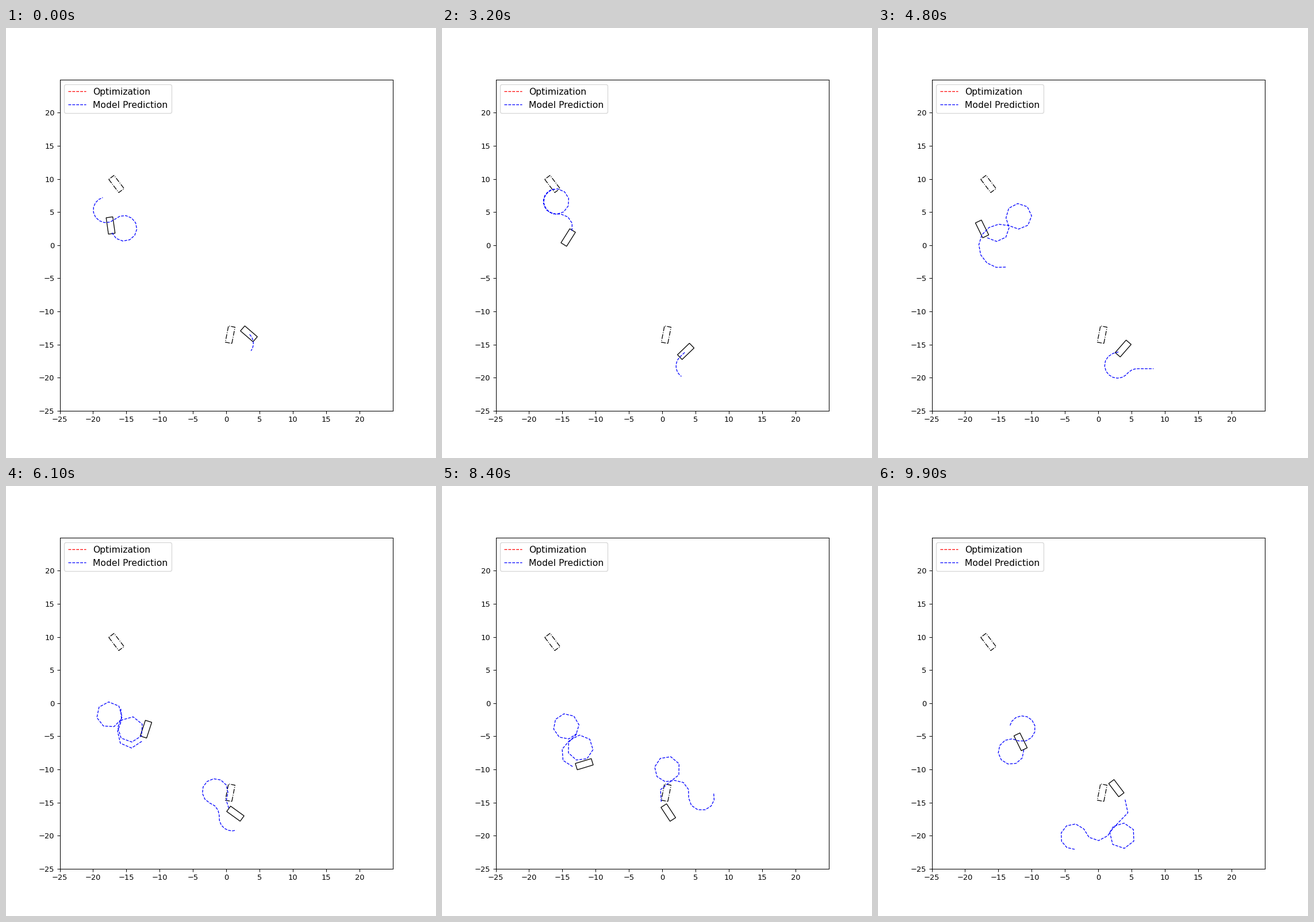
Animation of 748x748 px, one loop 10000 ms. Source, as a matplotlib script:

```python
import numpy as np
import matplotlib.pyplot as plt
from matplotlib.animation import FuncAnimation
from matplotlib.patches import Rectangle

SIZE, DPI, FRAMES = 748, 93.5, 100
LENGTH, WIDTH = 2.5, 1.0
HORIZON = 20
RADIUS = 1.93
CURVES = {"L": 1 / RADIUS, "R": -1 / RADIUS, "W": 1 / 3.3, "S": 0}
PLAN_AT = (0, 16, 32, 48, 61, 84, 99)


def drive(keys):
    """Poses per frame: circles between (frame, x, y, heading) keys, drifting to meet them."""
    pos, head = np.zeros(FRAMES, complex), np.zeros(FRAMES)
    for (f0, x0, y0, h0), (f1, x1, y1, h1) in zip(keys, keys[1:]):
        n = f1 - f0
        h = np.radians(np.linspace(h0, h1, n + 1))
        step = RADIUS * np.abs(np.diff(h)) * np.exp(0.5j * (h[1:] + h[:-1]))
        p = x0 + 1j * y0 + np.r_[0, np.cumsum(step)]
        p += (x1 + 1j * y1 - p[-1]) * np.linspace(0, 1, n + 1)
        pos[f0:f1 + 1], head[f0:f1 + 1] = p, h
    return pos, head


def plan(route, slowing):
    """Step lengths and turns of a route: L/R/W turn by degrees, S goes straight."""
    dist, head = [0], [0]
    for word in route.split():
        curve, amount = CURVES[word[0]], float(word[1:])
        turn = np.sign(curve) * np.radians(amount)
        dist.append(dist[-1] + (turn / curve if curve else amount))
        head.append(head[-1] + turn)
    s = np.linspace(0, dist[-1], 2001)
    h = np.interp((s[1:] + s[:-1]) / 2, dist, head)
    path = np.r_[0, np.cumsum(s[1] * np.exp(1j * h))]
    t = np.linspace(0, 1, HORIZON + 1)
    steps = np.diff(np.interp((t + slowing * t * (1 - t)) * s[-1], s, path))
    return np.abs(steps), np.angle(steps / np.r_[1, steps[:-1]])


class Car:
    def __init__(self, keys, routes):
        self.pos, self.head = drive(keys)
        self.plans = [plan(*r) for r in routes]

    def predict(self, i):
        """New turns enter the plan from the far end of the horizon."""
        k = min(np.searchsorted(PLAN_AT, i, side="right") - 1, len(PLAN_AT) - 2)
        u = (i - PLAN_AT[k]) / (PLAN_AT[k + 1] - PLAN_AT[k])
        (len0, turn0), (len1, turn1) = self.plans[k], self.plans[k + 1]
        turn = np.where(np.arange(HORIZON) < round(HORIZON * (1 - u)), turn0, turn1)
        step = (len0 + (len1 - len0) * u) * np.exp(1j * (self.head[i] + np.cumsum(turn)))
        return self.pos[i] + np.cumsum(step)


cars = (
    Car([(0, -17.37, 2.97, -82), (16, -15.04, 0.72, 381), (32, -14.13, 1.15, 778),
         (48, -17.45, 2.45, 1376), (56, -16.33, 1.19, 1776), (58, -13.23, -0.46, 1770),
         (61, -12.06, -3.93, 1692), (84, -11.72, -9.22, 557), (99, -11.67, -5.84, -64)],
        [("S0.7 L306 R209", 0.25),
         ("S0.4 L84 R321", 0),
         ("S0.7 L130 R539", 0),
         ("S0.9 L183 R330 W226", 0),
         ("S1.6 R162 S0.9 R395 L422", 0.1),
         ("S1 R152 S1.3 R372 L383", 0.1),
         ("S0.7 R322 L285", 0.25)]),
    Car([(0, 3.38, -13.39, -41), (16, 2.13, -12.70, -6), (32, 3.51, -16.04, -136),
         (48, 3.72, -15.61, -491), (61, 1.35, -16.69, -936),
         (84, 0.89, -16.52, -2037), (99, 2.70, -12.84, -2933)],
        [("R84", 0),
         ("S0.9", 0),
         ("S1.2 L100", 0),
         ("R40 L222 R51 S2.4", 0.4),
         ("S0.7 R75 L271 R70 S0.4 L108", 0.4),
         ("S1.9 R98 S1 L355 R120 L208", 0.35),
         ("S2.4 R90 S1.7 L395 R142 L255", 0.3)]))

fig, ax = plt.subplots(figsize=(SIZE / DPI, SIZE / DPI), dpi=DPI)
fig.subplots_adjust(left=0.125, right=0.9, bottom=0.11, top=0.88)
ticks = np.arange(-25, 25, 5)
ax.set(xlim=(-25, 25), ylim=(-25, 25), xticks=ticks, yticks=ticks)


def place(box, pos, head):
    box.set_xy((pos.real - LENGTH / 2, pos.imag - WIDTH / 2))
    box.set_angle(np.degrees(head))


def add_box(pos, head, style):
    box = Rectangle((0, 0), LENGTH, WIDTH, rotation_point="center",
                    fill=False, ec="k", lw=1, ls=style)
    place(box, pos, head)
    return ax.add_patch(box)


add_box(-16.5 + 9.24j, np.radians(-53), "-.")
add_box(0.57 - 13.52j, np.radians(79), "-.")
bodies = [add_box(c.pos[0], c.head[0], "-") for c in cars]
ax.plot([], [], "r--", lw=1, label="Optimization")
trails = [ax.plot([], [], "b--", lw=1, label=name)[0]
          for name in ("Model Prediction", "_nolegend_")]
ax.legend(loc="upper left", fontsize=12)


def update(i):
    for car, body, trail in zip(cars, bodies, trails):
        place(body, car.pos[i], car.head[i])
        path = car.predict(i)
        trail.set_data(path.real, path.imag)
    return bodies + trails


anim = FuncAnimation(fig, update, frames=FRAMES, interval=100, repeat=True, repeat_delay=0)
plt.show()
```
